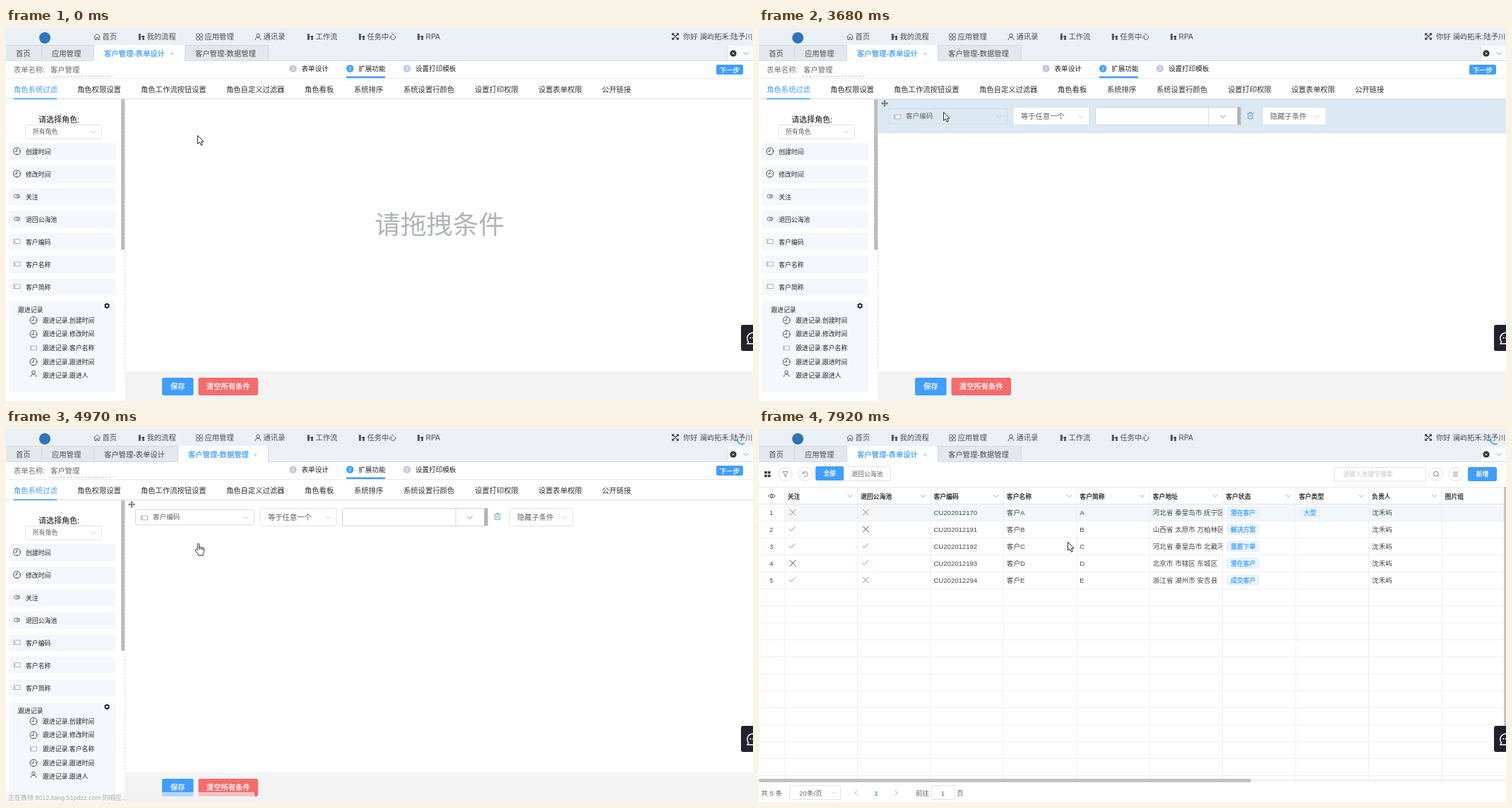
These frames come from a looping animation (1058 by 529 pixels, 8 s). An HTML page:

```html
<!DOCTYPE html>
<html lang="zh-CN">
<head>
<meta charset="utf-8">
<title>表单设计与数据管理</title>
<style>
html, body { margin: 0; width: 100%; height: 100%; overflow: hidden; background: #fff; }
svg { display: block; width: 100vw; height: 100vh; font-family: "Liberation Sans", "Noto Sans CJK SC", "Noto Sans CJK", sans-serif; }
text { white-space: pre; }
.firm { fill: currentColor; stroke: currentColor; stroke-width: .25; }
.late .odd { stroke: #444; }
</style>
</head>
<body>
<svg id="stage" viewBox="0 0 1058 529"></svg>
<script>
const LOOP = 8000, BLUE = '#409eff', GREY = '#606266', EDGE = '#dcdfe6', SOFT = '#c0c4cc';
const S = 8.85, M = 9.58, L = 10.3;

// Drawing helpers
const text = (x, cy, s, size = L, fill = '#333', more = '') =>
  `<text x="${x}" y="${(cy + size * .38).toFixed(2)}" font-size="${size}" fill="${fill}" ${more}>${s}</text>`;
const firm = (x, cy, s, size, color, more = '') => text(x, cy, s, size, color, `class="firm" color="${color}" ${more}`);
const mid = (x, cy, s, size, fill, more = '') => text(x, cy, s, size, fill, 'text-anchor="middle" ' + more);
const rect = (x, y, w, h, fill, more = '') =>
  `<rect x="${x}" y="${y}" width="${w}" height="${h}" fill="${fill}" ${more}/>`;
const box = (x, y, w, h, stroke = EDGE, fill = '#fff') =>
  rect(x + .5, y + .5, w - 1, h - 1, fill, `stroke="${stroke}" stroke-width=".9" rx="2.5"`);
const line = (x1, y1, x2, y2, c, more = '') =>
  `<path d="M${x1} ${y1}L${x2} ${y2}" stroke="${c}" ${more}/>`;
const path = (d, c, w = 1, fill = 'none', more = '') =>
  `<path d="${d}" fill="${fill}" stroke="${c}" stroke-width="${w}" ${more}/>`;
const disc = (x, y, r, fill, stroke = 'none', w = 1) =>
  `<circle cx="${x}" cy="${y}" r="${r}" fill="${fill}" stroke="${stroke}" stroke-width="${w}"/>`;
const at = (x, y, s) => `<g transform="translate(${x} ${y})">${s}</g>`;
const group = (id, s) => `<g id="${id}">${s}</g>`;
const chevron = (x, y, c = SOFT, w = 3.7) => path(`M${x - w} ${y - w / 2}l${w} ${w}l${w} ${-w}`, c, .9);
const button = (x, y, w, h, fill, s, size = L) =>
  rect(x, y, w, h, fill, 'rx="2.5"') + firm(x + w / 2, y + h / 2, s, size, '#fff', 'text-anchor="middle"');
const closeX = (x, y, c, r = 2) => path(`M${x - r} ${y - r}l${2 * r} ${2 * r}m0 ${-2 * r}l${-2 * r} ${2 * r}`, c, .8);

const icon = {
  home: path('M-4.5 0L0-4.2 4.5 0M-3.2-1V4H-1V1H1V4H3.2V-1', '#555', .9),
  flow: path('M-2.7-3V3M-2.7 0H2.5V3', '#444', .8) +
    path('M-4.2-4.3h3v2.6h-3zM-4.2-1.3h3v2.6h-3zM-4.2 1.7h3v2.6h-3zM1-1.4h3v2.7H1zM1 1.9h3v2.4H1z', 'none', 0, '#444'),
  apps: [[-2.5, -2.5], [2.5, -2.5], [-2.5, 2.5], [2.5, 2.5]]
    .map(p => rect(p[0] - 2, p[1] - 2, 4, 4, 'none', 'rx="1.3" stroke="#555" stroke-width=".9"')).join(''),
  person: disc(0, -2, 2.3, 'none', '#444', .9) + path('M-4 4.6C-4 1.8-2 .8 0 .8S4 1.8 4 4.6', '#444', .9),
  clock: disc(0, 0, 5, '#fff', '#333', .9) + path('M0-3.5V.3H-3.2M2.8 0h1.2M0 2.8V4', '#333', .9),
  toggle: rect(-4, -2.4, 8, 4.8, '#fff', 'rx="2.4" stroke="#666" stroke-width=".9"') + disc(1.2, 0, 1.6, 'none', '#666', .9),
  input: rect(-4.5, -2.9, 9, 5.8, '#fff', 'stroke="#9aa0a8" stroke-width=".8"') + line(-2.8, -1.6, -2.8, 1.6, '#777', 'stroke-width=".8"'),
  move: path('M-4 0H4M0-4V4M-2.6-1.4L-4.2 0-2.6 1.4M2.6-1.4L4.2 0 2.6 1.4M-1.4-2.6L0-4.2 1.4-2.6M-1.4 2.6L0 4.2 1.4 2.6', '#333', .9),
  expand: path('M-4-4L4 4M4-4L-4 4M-4.3-1.5V-4.3H-1.5M1.5-4.3H4.3V-1.5M4.3 1.5V4.3H1.5M-1.5 4.3H-4.3V1.5', '#333', 1.1),
  gear: disc(0, 0, 2.5, '#fff', '#111', 1.5) + path('M0-4V-2.5M0 4V2.5M-3.5-2L-2.2-1.2M3.5 2L2.2 1.2M3.5-2L2.2-1.2M-3.5 2L-2.2 1.2', '#111', 1.4),
  trash: path('M-4.5-3H4.5M-1.5-3V-4.5H1.5V-3M-3.4-3V4.6H3.4V-3M-1.1-.8V2.6M1.1-.8V2.6', '#6a9cc4', .9),
  arrow: path('M0 0V11.8L2.8 9.3 4.8 13.8 6.8 13 4.9 8.7H8.5Z', '#111', .9, '#fff'),
  hand: path('M-1.3 8.6V1.2a1.25 1.25 0 0 1 2.5 0V5.4c.6-.8 2.1-.7 2.5.3.7-.6 2-.4 2.3.6.8-.5 2 0 2 1.2V11c0 2-.8 2.8-1.3 3.9V16.6H-.2V15.2C-1.6 13.8-3.6 11.4-4.2 9.6c-.4-1.4 1.1-1.9 1.9-1.2ZM1.2 5.4V8.6M3.7 5.7V8.6M6 6.3V8.8', '#111', .9, '#fff', 'stroke-linejoin="round"')
};
icon.cross = '<g transform="scale(1.8)">' + icon.move + '</g>';

function header() {
  const nav = [['home', 129, '首页'], ['flow', 192, '我的流程'], ['apps', 274, '应用管理'], ['person', 357, '通讯录'],
    ['flow', 431, '工作流'], ['flow', 504, '任务中心'], ['flow', 587, 'RPA']];
  return rect(0, 0, 1058, 46, '#ebf0f6') + disc(55, 14, 8, '#2f74b8') +
    nav.map(([k, x, s]) => at(x, 12.5, icon[k]) + text(x + 7.5, 12.5, s, L, '#4a4a4a')).join('') +
    at(948, 12, icon.expand) + text(959, 12.5, '你好 澜屿拓禾:陆予川', L, '#4a4a4a') +
    rect(1022, 25, 36, 21, '#f8fafc') + line(1022, 25, 1022, 46, '#d9dee5') +
    disc(1030, 36, 4.6, '#333') + closeX(1030, 36, '#fff', 1.6) + chevron(1048, 36, '#888', 3.2);
}

// Tab strip; the active tab grows by its close mark
function tabs(second) {
  const split = second ? 243 : 253, a = second ? split : 124, b = second ? 371 : split;
  const sep = x => line(x + .5, 24, x + .5, 46, '#d3d8df');
  const label = (x, s, on) => on ? firm(x, 36, s, L, BLUE) : text(x, 36, s, L, '#4a4a4a');
  return rect(0, 24, 371, 22, '#e3e8ee') + line(0, 24.5, 371, 24.5, '#d3d9e0') + line(0, 46.5, 1058, 46.5, '#d8dde3') +
    rect(a, 24, b - a, 23, '#fff') + [50, 124, split, 371].map(sep).join('') +
    label(14, '首页') + label(65, '应用管理') + label(139, '客户管理-表单设计', !second) +
    label(split + 15, '客户管理-数据管理', second) + closeX(b - 18, 36.5, '#79b0ea');
}

function item(x, y, kind, s) {
  return rect(x, y, 151, 24.5, '#f4f7fd', 'rx="3"') + at(x + 11.5, y + 11.7, icon[kind]) + text(x + 24, y + 12.3, s, S, '#222');
}

function formPage() {
  const steps = ['表单设计', '扩展功能', '设置打印模板'];
  const sections = [[11, '角色系统过滤'], [101, '角色权限设置'], [191, '角色工作流按钮设置'], [312, '角色自定义过滤器'], [423, '角色看板'],
    [493, '系统排序'], [563, '系统设置行颜色'], [664, '设置打印权限'], [754, '设置表单权限'], [844, '公开链接']];
  const fields = [['clock', '创建时间'], ['clock', '修改时间'], ['toggle', '关注'], ['toggle', '退回公海池'],
    ['input', '客户编码'], ['input', '客户名称'], ['input', '客户简称']];
  const subs = [['clock', '创建时间'], ['clock', '修改时间'], ['input', '客户名称'], ['clock', '跟进时间'], ['person', '跟进人']];
  return rect(0, 47, 1058, 482, '#fff') +
    text(11, 59, '表单名称:', L, '#777') + text(63, 59, '客户管理', L, '#666') +
    line(61, 68.5, 152, 68.5, '#c4c4c4', 'stroke-dasharray="3 2"') +
    steps.map((s, i) => {
      const x = 406.5 + 80.7 * i, on = i == 1;
      return disc(x, 57.5, 5.2, on ? BLUE : '#c0cada') + mid(x, 57.5, i + 1, 7.5, '#fff') + text(x + 12, 57.5, s, M, '#222');
    }).join('') + rect(482, 68.5, 55, 2.5, BLUE) + button(1006, 52, 38, 14, BLUE, '下一步', M) +
    line(0, 71.5, 1058, 71.5, '#e8eaed') + line(0, 100.5, 1058, 100.5, '#d8dbe0') +
    sections.map(([x, s], i) => text(x, 87, s, L, i ? '#303133' : BLUE)).join('') + rect(11, 99.5, 61, 1.7, BLUE) +
    text(46, 130, '请选择角色:', 11, '#111') + box(27, 137, 109, 20.5) + text(38, 147, '所有角色', S, GREY) + chevron(123.5, 147.3) +
    fields.map(([k, s], i) => item(4, 163 + 32 * i, k, s)).join('') +
    rect(4, 387, 151, 129, '#f4f7fd', 'rx="3"') + text(17, 399.5, '跟进记录', S, '#222') + at(143, 394, icon.gear) +
    subs.map(([k, s], i) => at(39, 414.5 + 19.7 * i - (i == 4 ? 3 : 0), icon[k]) + text(52, 414.3 + 19.7 * i, '跟进记录.' + s, S, '#222')).join('') +
    line(168.5, 101, 168.5, 486, '#ddd', 'stroke-dasharray="3 2"') + rect(163, 101, 5, 214, '#bdbdbd', 'rx="2"') +
    group('hint', text(522, 278, '请拖拽条件', 36.8, '#b0b4bb')) + group('row', condition()) +
    rect(168, 487, 890, 42, '#f3f3f3') + button(221, 496, 44.5, 25, BLUE, '保存') + button(272.5, 496, 84.5, 25, '#f56c6c', '清空所有条件');
}

function condition() {
  return rect(168, 101, 890, 48.5, '#dce9f3', 'id="glow"') + at(178, 107, icon.move) +
    rect(183.5, 114.5, 168, 21.5, 'none', 'id="pick" rx="2.5" stroke="#d3d9e2"') + at(196, 126, icon.input) +
    text(208, 124, '客户编码', M, GREY) + chevron(340, 125.5, '#a9c3da') +
    box(359.5, 112, 109, 26) + text(371, 125.5, '等于任意一个', L, GREY) + chevron(456, 125.5) +
    rect(476.5, 112.5, 201, 25, '#fff', 'stroke="#cfd2d8" rx="2"') + line(637, 112, 637, 138, '#cfd2d8') + chevron(657, 125.5, '#777') +
    rect(677.5, 112, 5, 25.5, '#b3b3b3', 'rx="1.5"') + at(696, 124, icon.trash) +
    box(712.5, 112, 91, 26) + text(724, 125.5, '隐藏子条件', L, GREY) + chevron(791, 125.5);
}

const COL = 103.45, ROW = 24.06;
function tablePage() {
  const heads = ['关注', '退回公海池', '客户编码', '客户名称', '客户简称', '客户地址', '客户状态', '客户类型', '负责人', '图片组'];
  const rows = [[0, 0, '2170', '河北省 秦皇岛市 抚宁区', '潜在客户'], [1, 0, '2191', '山西省 太原市 万柏林区', '解决方案'],
    [1, 1, '2192', '河北省 秦皇岛市 北戴河区', '意愿下单'], [0, 1, '2193', '北京市 市辖区 东城区', '潜在客户'], [1, 0, '2294', '浙江省 湖州市 安吉县', '成交客户']];
  const cx = i => 40.5 + COL * i;
  const mark = (ok, x, y, i) => ok ? path(`M${x + 2} ${y - .8}l3 3L${x + 11} ${y - 4}`, '#5fae45', 1)
    : path(`M${x + 3} ${y - 4.4}l8.6 8.6m0-8.6l-8.6 8.6`, '#b9704f', .95, 'none', i % 2 ? 'class="odd"' : '');
  const tag = (x, y, s) => rect(x, y - 7, s.length * S + 9.2, 14, '#ecf5ff', 'rx="2" stroke="#d5e9fd" stroke-width=".8"') + firm(x + 4.6, y, s, S, BLUE);
  const ring = (x, s) => disc(x, 64, 9.7, '#fff', EDGE, .9) + at(x, 64, s);
  let s = rect(0, 47, 1058, 482, '#fff') +
    [0, 4.8].map(a => [0, 4.8].map(b => rect(7.8 + a, 60 + b, 3.6, 3.4, '#333')).join('')).join('') +
    ring(37.5, path('M-3.8-3.5H3.8L1 0V4L-1 3V0Z', '#777', .8)) +
    ring(65.5, path('M-3-1.2A3.4 3.4 0 1 1-2 2.7M-3.4-3.6V-1H-.8', '#777', .9)) +
    box(119, 53, 68, 21) + text(131, 63.5, '退回公海池', S, GREY) + button(80, 53, 40, 20, BLUE, '全部', S) +
    box(815, 54, 130, 20.5) + text(827, 64, '请输入关键字搜索', S, SOFT) +
    ring(959, disc(-.3, -.4, 3.3, 'none', '#777', .9) + path('M2 2L4 4', '#777', .9)) +
    ring(986.5, path('M-3.6-2.8H3.6M-3.6 0H3.6M-3.6 2.8H3.6', '#777', .9)) + button(1004, 54, 41, 20, BLUE, '新增', S) +
    rect(36, 107, 1019, 23.5, '#f4f7fa') + rect(36, 0, 1019, 23.5, '#f4f4f4', 'id="band"') +
    line(0, 82.5, 1058, 82.5, '#e6e9ef');
  for (let i = 0; i <= 16; i++) s += line(0, 106.5 + ROW * i, 1055, 106.5 + ROW * i, i ? '#ebeef5' : '#e2e5eb');
  s += path('M13 95Q18 89.5 23 95Q18 100.5 13 95Z', '#555', .9) + disc(18, 95, 1.6, 'none', '#555', .9);
  heads.forEach((h, i) => {
    const x = 36 + COL * i;
    s += line(x, 82, x, 496, '#ebeef5') + firm(cx(i), 95.3, h, S, '#222', `id="head${i}"`);
    if (i < 9) s += chevron(129 + COL * i, 95, '#999', 3.2);
  });
  rows.forEach(([a, b, code, place, state], i) => {
    const y = 118.3 + 24 * i, name = 'ABCDE'[i], cell = (c, v) => text(cx(c), y, v, M, '#444');
    s += mid(17.5, y, i + 1, S, '#444') + mark(a, 40.5, y, i) + mark(b, cx(1), y, i) +
      cell(2, 'CU20201' + code) + cell(3, '客户' + name) + cell(4, name) +
      `<g clip-path="url(#place)">${cell(5, place)}</g>` + tag(663.5, y, state) + cell(8, '沈禾屿');
  });
  return s + tag(767, 118.3, '大型') + rect(0, 496, 1058, 5, '#f5f5f5') + rect(0, 496, 697, 5, '#c1c1c1', 'rx="2"') +
    rect(1055, 82, 3, 360, '#c4c4c4') +
    text(3, 516, '共 5 条', M, GREY) + box(43, 505, 73, 21) + text(57, 516, '20条/页', M, GREY) + chevron(106.5, 516, SOFT, 3) +
    path('M139 512.5L135.5 516L139 519.5', '#aaa') + mid(166, 516, '1', M, BLUE, 'font-weight="bold"') +
    path('M192.5 512.5L196 516L192.5 519.5', '#aaa') +
    text(222, 516, '前往', M, GREY) + box(244, 505, 33.5, 21) + mid(260.5, 516, '1', M, GREY) + text(280, 516, '页', M, GREY);
}

const stage = document.getElementById('stage');
stage.innerHTML = '<clipPath id="place"><path d="M553 82H656.5V240H553Z"/></clipPath>' +
  header() + group('tabA', tabs(false)) + group('tabB', tabs(true)) + group('form', formPage()) + group('table', tablePage()) +
  rect(1041, 421, 20, 37, '#20222d', 'rx="3"') +
  path('M1058 447.8H1050L1051.6 445A7.8 7.8 0 1 1 1058 447.8', '#fff', 1.5) + disc(1054.5, 439.5, 1.1, '#fff') + disc(1058, 439.5, 1.1, '#fff') +
  group('status', rect(0, 515, 352, 14, '#f3f3f3', 'opacity=".65"') + text(3, 522.5, '正在等待 8012.liang.51pdzz.com 的响应...', 9, '#aaa')) +
  group('spin', path('M6 0A6 6 0 0 1 -4.6 3.9', BLUE, 1.6)) +
  `<g id="ghost" opacity=".75">${item(0, 0, 'input', '客户编码')}</g>` +
  ['arrow', 'hand', 'cross'].map(k => group(k, icon[k])).join('');

const el = id => document.getElementById(id);
const show = (id, on) => el(id).setAttribute('display', on ? 'inline' : 'none');
const place = (id, x, y, more = '') => el(id).setAttribute('transform', `translate(${x} ${y}) ${more}`);

// The picture refreshes in bursts: start, end, steps
const bursts = [[70, 70, 1], [270, 1060, 11], [1130, 1130, 1], [1420, 1970, 8], [2270, 2580, 5], [2980, 3750, 11],
  [3850, 4650, 11], [4750, 5520, 11], [5600, 6370, 11], [6450, 7240, 11], [7460, 7920, 7]];
function snap(t) {
  let u = 0;
  for (const [a, b, n] of bursts) {
    if (t < a) break;
    const step = n > 1 ? (b - a) / (n - 1) : 1;
    u = a + step * Math.min(n - 1, Math.floor((t - a) / step + 1e-6));
  }
  return u;
}

// Pointer: time, x, y
const route = [[0, 271, 152], [70, 265, 147], [350, 296, 160], [700, 180, 235], [1060, 74, 297], [1130, 75, 303], [1420, 80, 301],
  [1970, 298, 236], [2270, 292, 220], [2420, 268, 160], [2440, 268, 160], [2580, 262, 128], [2980, 262, 126], [3290, 272, 68],
  [3660, 261, 119], [3760, 261, 119], [4150, 290, 34], [4400, 295, 38], [4750, 275, 162], [5280, 266, 163], [5370, 266, 163],
  [5600, 260, 168], [6370, 165, 215], [6450, 163, 228], [6685, 161, 101], [6770, 161, 101], [7240, 188, 33], [7460, 190, 35], [7920, 437, 160]];
function pointer(u) {
  const i = Math.max(1, route.findIndex(p => p[0] >= u)), [t0, x0, y0] = route[i - 1], [t1, x1, y1] = route[i];
  const k = (u - t0) / (t1 - t0);
  return [Math.round(x0 + (x1 - x0) * k), Math.round(y0 + (y1 - y0) * k)];
}

function draw(t) {
  const u = snap(t), [x, y] = pointer(u);
  const table = u >= 4980, second = u >= 4380 && u < 7460, row = u >= 1960, live = u < 7460;
  show('tabA', !second); show('tabB', second);
  show('form', !table); show('table', table);
  show('hint', !row); show('row', row);
  const glow = u < 4380 && y > 101 && y < 149;
  show('glow', glow);
  el('pick').setAttribute('fill', glow ? 'none' : '#fff');
  show('status', u >= 4600 && !table);
  show('spin', u >= 4480 && !table || u >= 7600);
  place('spin', 1042.5, 15.5, `rotate(${(u - 4750) * .36})`);
  show('ghost', u >= 1420 && u < 1960);
  place('ghost', x - 70, y - 11);

  const r = Math.floor((y - 106.5) / ROW);
  show('band', live && r > 0 && r < 5);
  el('band').setAttribute('y', 107 + ROW * r);
  const c = table && live && y > 82 && y < 106 ? Math.floor((x - 36) / COL) : -1;
  for (let i = 0; i < 10; i++) el('head' + i).setAttribute('color', i == c ? BLUE : '#222');
  el('table').setAttribute('class', u >= 5600 ? 'late' : '');

  const kind = u >= 4000 && u < 7530 ? 'hand' : u < 1420 && x < 156 && y > 163 ? 'cross' : 'arrow';
  ['arrow', 'hand', 'cross'].forEach(k => show(k, k == kind));
  place(kind, x + .5, y + .5);
}

const start = performance.now();
function tick() {
  draw((performance.now() - start) % LOOP);
  requestAnimationFrame(tick);
}
tick();
</script>
</body>
</html>
```
